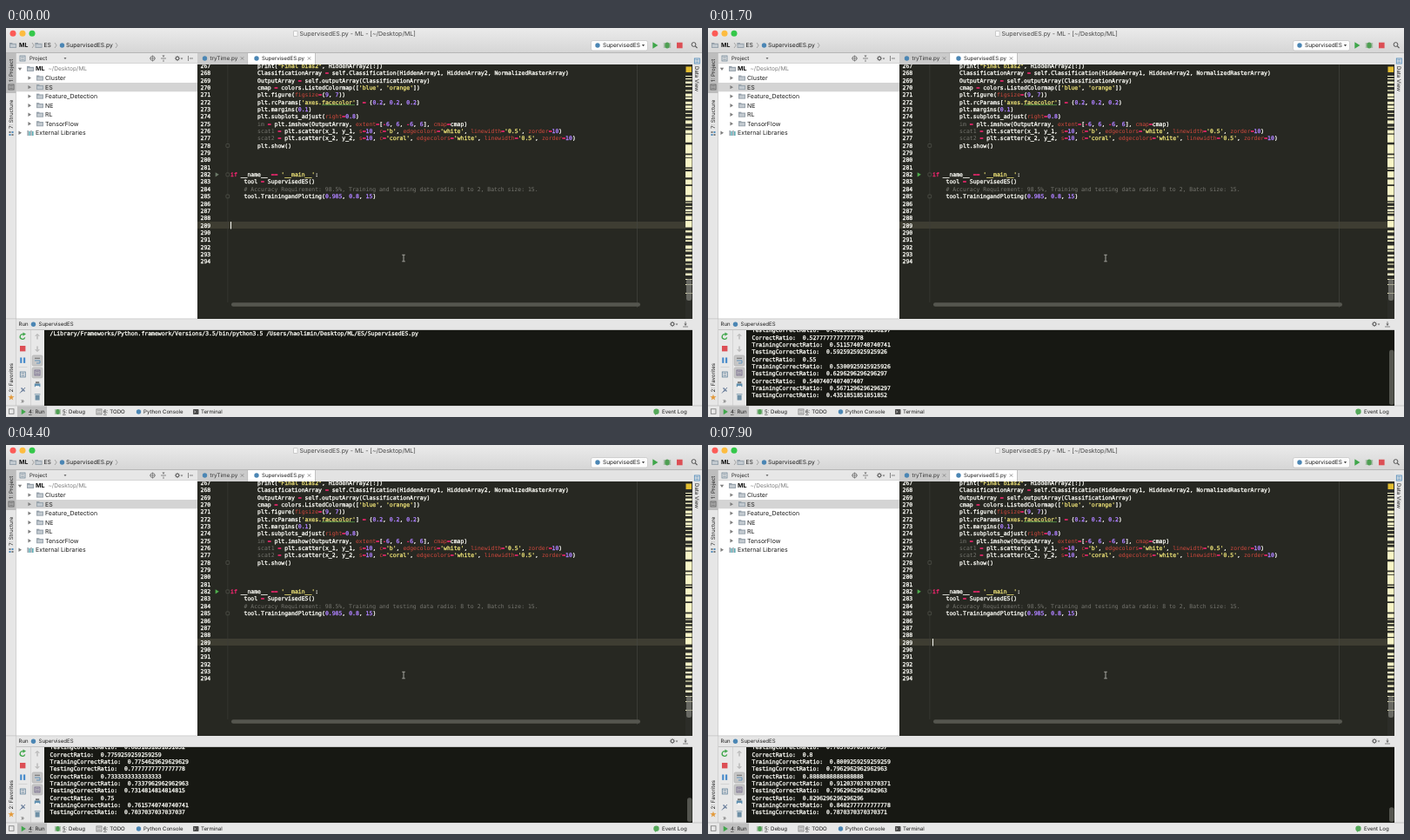
Write an HTML page with a canvas that moves like this. It is 800 px wide and 448 px high and loops after 8000 ms.

```html
<!DOCTYPE html>
<html lang="en">
<head>
<meta charset="utf-8">
<title>SupervisedES.py</title>
<style>
html, body { margin: 0; width: 100%; height: 100%; overflow: hidden; background: #e6e6e6; }
canvas { display: block; width: 800px; height: 448px; }
</style>
</head>
<body>
<canvas id="stage" width="800" height="448"></canvas>
<script>
const W = 800, H = 448, LOOP = 8000;
const UI = 'Inter, Roboto, sans-serif';
const MONO = '6.46px "DejaVu Sans Mono", "Liberation Mono", monospace';
const CHAR = 3.89, LINE = 8.346;
const DARK = '#272822', BLACK = '#171813', WHITE = '#f8f8f2', DIM = '#75756f', KWARG = '#d0483c';
const PY = '#4b86b4', GREEN = '#3fa64a', RED = '#dc4f55', GREY = '#6e6e6e';

const stage = document.getElementById('stage').getContext('2d');
const base = document.createElement('canvas');
base.width = W;
base.height = H;
let g = base.getContext('2d');
g.textRendering = stage.textRendering = 'geometricPrecision';

// ---- drawing helpers ----
function box(x, y, w, h, color) {
  g.fillStyle = color;
  g.fillRect(x, y, w, h);
}
function round(x, y, w, h, r, color, edge) {
  g.beginPath();
  g.roundRect(x, y, w, h, r);
  if (color) { g.fillStyle = color; g.fill(); }
  if (edge) { g.strokeStyle = edge; g.lineWidth = 0.6; g.stroke(); }
}
function dot(x, y, r, color) {
  g.beginPath();
  g.arc(x, y, r, 0, 7);
  g.fillStyle = color;
  g.fill();
}
function ring(x, y, r, color, w = 0.8) {
  g.beginPath();
  g.arc(x, y, r, 0, 7);
  g.strokeStyle = color;
  g.lineWidth = w;
  g.stroke();
}
function poly(points, color) {
  g.beginPath();
  for (let i = 0; i < points.length; i += 2) g.lineTo(points[i], points[i + 1]);
  g.fillStyle = color;
  g.fill();
}
function line(color, w, ...p) {
  g.beginPath();
  g.moveTo(p[0], p[1]);
  for (let i = 2; i < p.length; i += 2) g.lineTo(p[i], p[i + 1]);
  g.strokeStyle = color;
  g.lineWidth = w;
  g.stroke();
}
function clipTo(x, y, w, h) {
  g.save();
  g.beginPath();
  g.rect(x, y, w, h);
  g.clip();
}
function label(s, x, y, size = 6.1, color = '#1c1c1c', weight = 400) {
  g.font = `${weight} ${size}px ${UI}`;
  g.fillStyle = color;
  g.fillText(s, x, y + size * 0.35);
}
function sideLabel(s, x, bottom, dir = -1) {
  g.save();
  g.translate(x, bottom);
  g.rotate(dir * Math.PI / 2);
  label(s, 0, 0, 6.1);
  g.restore();
}
// a thin outline gives the heavier smoothing of bright code text
function mono(s, x, y, color = WHITE) {
  g.font = MONO;
  g.fillStyle = color;
  g.fillText(s, x, y + 2.3);
  if (color === DIM || color === KWARG) return;
  g.strokeStyle = color;
  g.lineWidth = 0.32;
  g.lineJoin = 'round';
  g.strokeText(s, x, y + 2.3);
}

// ---- icons ----
const right = (x, y, r, c) => poly([x - r * 0.7, y - r, x + r * 0.9, y, x - r * 0.7, y + r], c);
const down = (x, y, r, c) => poly([x - r, y - r * 0.7, x + r, y - r * 0.7, x, y + r * 0.8], c);
const chevron = (x, y) => line('#8c8c8c', 0.7, x - 1, y - 3, x + 1.2, y, x - 1, y + 3);
const pyFile = (x, y) => dot(x, y, 2.7, PY);
function cross(x, y) {
  line('#808080', 0.8, x - 1.7, y - 1.7, x + 1.7, y + 1.7);
  line('#808080', 0.8, x + 1.7, y - 1.7, x - 1.7, y + 1.7);
}
function folder(x, y) {
  box(x - 4, y - 3, 3.4, 2, '#8f9aa3');
  box(x - 4, y - 2.2, 8, 5.2, '#9aa5ae');
  box(x - 3, y - 1, 6, 3, '#c3cad0');
}
function gear(x, y) {
  ring(x, y, 1.8, GREY, 1.3);
  for (let a = 0; a < 8; a++) {
    const c = Math.cos(a * Math.PI / 4), s = Math.sin(a * Math.PI / 4);
    line(GREY, 0.8, x + 2 * c, y + 2 * s, x + 3.1 * c, y + 3.1 * s);
  }
  down(x + 5, y + 0.5, 1.3, GREY);
}
function hide(x, y) {
  line(GREY, 0.8, x, y - 3, x, y + 1);
  down(x, y + 0.8, 1.7, GREY);
  line(GREY, 0.8, x - 3, y + 3, x + 3, y + 3);
}
function bug(x, y, r = 3) {
  for (let k = -1; k < 2; k++) line('#4d7f4d', 0.7, x - r - 0.6, y + k * 2, x + r + 0.6, y + k * 2);
  g.beginPath();
  g.ellipse(x, y, r * 0.75, r, 0, 0, 7);
  g.fillStyle = '#4f9f53';
  g.fill();
}
function arrow(x, y, dir) {
  line('#a4a4a4', 1, x, y - 3 * dir, x, y + 2 * dir);
  line('#a4a4a4', 1, x - 2.2, y + 0.7 * dir, x, y + 3 * dir, x + 2.2, y + 0.7 * dir);
}
function sheet(x, y, color) {
  g.strokeStyle = color;
  g.lineWidth = 0.8;
  g.strokeRect(x - 3, y - 3, 6, 6);
  for (let k = -1; k < 2; k++) line(color, 0.6, x - 1.8, y + k * 1.6, x + 1.8, y + k * 1.6);
}

// ---- window parts ----
function titleAndToolbar() {
  const fade = g.createLinearGradient(0, 0, 0, 28);
  fade.addColorStop(0, '#ebebeb');
  fade.addColorStop(1, '#d6d6d6');
  box(0, 0, W, 28, fade);
  ['#fc5b57', '#fdbc40', '#34c84a'].forEach((c, i) => dot(8 + i * 11, 6.3, 3.5, c));
  round(330.5, 3.5, 4.6, 6, 0.4, '#fafafa', '#b0b0b0');
  label('SupervisedES.py - ML - [~/Desktop/ML]', 337.5, 6.5, 7, '#464646');

  folder(8, 20);
  label('ML', 15, 20, 6.9, '#111', 700);
  chevron(31, 20);
  folder(37.5, 20);
  label('ES', 43.5, 20, 6.8);
  chevron(57, 20);
  pyFile(64.5, 20);
  label('SupervisedES.py', 69, 20, 6.7);
  chevron(127, 20);

  round(672.5, 14.5, 65, 11.5, 2, '#fcfcfc', '#bcbcbc');
  pyFile(680, 20);
  label('SupervisedES', 686, 20, 6.5);
  down(732.5, 20, 1.6, '#444');
  right(746, 20, 3.8, GREEN);
  bug(760, 20, 3.6);
  box(771, 16.7, 6.6, 6.6, RED);
  ring(790.5, 19, 2.4, '#555', 1);
  line('#555', 1.1, 792.3, 20.8, 794.5, 23);
  box(0, 28, W, 1, '#b6b6b6');
}

function sideStrips() {
  box(0, 29, 12, H, '#e6e6e6');
  box(0, 29, 11.5, 46, '#bdbdbd');
  sideLabel('1: Project', 6, 62);
  sheet(6, 68, '#555');
  sideLabel('7: Structure', 6, 116);
  for (let k = 0; k < 4; k++) box(3.5 + k % 2 * 3, 119 + (k >> 1) * 3, 2, 2, k % 3 ? '#4a87b8' : '#777');
  sideLabel('2: Favorites', 6, 419.5);
  const star = [];
  for (let i = 0; i < 10; i++) {
    const r = i % 2 ? 1.5 : 3.8, a = i * Math.PI / 5 - Math.PI / 2;
    star.push(6 + r * Math.cos(a), 425.5 + r * Math.sin(a));
  }
  poly(star, '#e39a3b');
  box(11.5, 29, 0.7, 406, '#bdbdbd');

  box(789, 29, 11, 406, '#e6e6e6');
  sheet(794.3, 38, '#4a87b8');
  sideLabel('Data View', 794, 44, 1);
}

function projectPanel() {
  box(12, 29, 208, 11, '#e7e7e7');
  box(12, 40, 208, 295, '#fff');
  box(12, 40, 208, 0.7, '#c4c4c4');
  sheet(19, 35, '#6f8596');
  label('Project', 27, 35);
  down(68, 35, 1.5, GREY);
  ring(168.5, 35, 2.6, GREY);
  line(GREY, 0.7, 165, 35, 172, 35);
  line(GREY, 0.7, 168.5, 31.5, 168.5, 38.5);
  line(GREY, 0.8, 178, 35, 184, 35);
  down(181, 32.6, 1.5, GREY);
  line(GREY, 0.8, 181, 36.5, 181, 39);
  gear(197, 35);
  line(GREY, 0.8, 209.5, 32, 209.5, 38);
  line(GREY, 0.8, 215, 35, 211, 35);

  box(12, 63, 208, 10.3, '#d4d4d4');
  down(16, 47.2, 2.2, '#7d7d7d');
  folder(28, 47);
  label('ML', 34, 47, 7, '#111', 700);
  label('~/Desktop/ML', 48.5, 47, 6.6, '#7d7d7d');
  ['Cluster', 'ES', 'Feature_Detection', 'NE', 'RL', 'TensorFlow'].forEach((name, i) => {
    const y = 57.6 + i * 10.53;
    right(27, y, 2.2, '#7d7d7d');
    folder(39, y);
    label(name, 45, y, 7);
  });
  right(16, 120.8, 2.2, '#7d7d7d');
  for (let k = 0; k < 4; k++) box(24.5 + k * 1.9, 118 + k % 2, 1.3, 6 - k % 2, k % 2 ? '#3f9fa8' : '#8a969f');
  label('External Libraries', 34, 120.8, 7);
}

function tabs() {
  box(220, 29, 569, 13, '#e3e3e3');
  box(220, 29, 57.5, 13, '#cbcbcb');
  pyFile(228.5, 35);
  label('tryTime.py', 234.5, 35, 6.3, '#333');
  cross(271.5, 35);
  box(278, 29, 77, 13, '#fff');
  pyFile(288, 35);
  label('SupervisedES.py', 294, 35, 6.1);
  cross(348.5, 35);
  box(277.5, 29, 0.6, 13, '#aaa');
  box(355, 29, 0.6, 13, '#aaa');
}

// ---- code ----
const body = [
  'print("Final bias2", HiddenArray2[:])',
  'ClassificationArray = self.Classification(HiddenArray1, HiddenArray2, NormalizedRasterArray)',
  'OutputArray = self.outputArray(ClassificationArray)',
  "cmap = colors.ListedColormap(['blue', 'orange'])",
  'plt.figure(figsize=(9, 7))',
  "plt.rcParams['axes.facecolor'] = (0.2, 0.2, 0.2)",
  'plt.margins(0.1)',
  'plt.subplots_adjust(right=0.8)',
  'im = plt.imshow(OutputArray, extent=[-6, 6, -6, 6], cmap=cmap)',
  "scat1 = plt.scatter(x_1, y_1, s=10, c='b', edgecolors='white', linewidth='0.5', zorder=10)",
  "scat2 = plt.scatter(x_2, y_2, s=10, c='coral', edgecolors='white', linewidth='0.5', zorder=10)",
  'plt.show()'
].map(s => ' '.repeat(8) + s);
const code = body.concat('', '', '',
  "if __name__ == '__main__':",
  '    tool = SupervisedES()',
  '    # Accuracy Requirement: 98.5%, Training and testing data radio: 8 to 2, Batch size: 15.',
  '    tool.TrainingandPloting(0.985, 0.8, 15)');

const rules = [
  [/^#.*/, DIM],
  [/^(['"]).*?\1/, '#e6db74'],
  [/^(if\b|==?|-)/, '#f92672'],
  [/^(im|scat\d)\b/, DIM],
  [/^[a-z]+(?==[^= ])/, KWARG],
  [/^\d[\d.]*/, '#ae81ff'],
  [/^\w+|^\s+|^./, WHITE]
];
const lineY = n => 52 + (n - 268) * LINE;

function codeLine(text, y) {
  let col = 0;
  while (col < text.length) {
    const rest = text.slice(col);
    const [re, color] = rules.find(r => r[0].test(rest));
    const token = rest.match(re)[0];
    mono(token, 258 + col * CHAR, y, color);
    col += token.length;
  }
}

function errorStripe() {
  let seed = 11;
  const rand = () => (seed = seed * 16807 % 2147483647) / 2147483647;
  box(781, 42, 8, 293, '#2c2d28');
  box(781.5, 44.5, 6.5, 6.5, '#e3bd2f');
  for (let y = 55; y < 284;) {
    const dense = Math.exp(-(((y - 150) / 60) ** 2));
    const h = 1 + rand() * rand() * (5 + 7 * dense);
    box(781, y, 7.5, h, '#f8f5c6');
    y += h + 0.8 + rand() * (4 - 2 * dense);
  }
  [289, 295, 305].forEach(y => box(781, y, 7.5, 1, '#f8f5c6'));
  round(782, 289, 6, 25, 2.5, 'rgba(130,131,124,.7)');
}

function editor() {
  clipTo(220, 42, 569, 293);
  box(220, 42, 569, 293, DARK);
  box(220, 223, 561, 8, '#3e3d32');
  box(254.6, 42, 0.6, 274, '#3c3d37');
  box(725, 42, 0.7, 280, '#45463f');
  for (let n = 267; n < 295; n++) mono(String(n), 223.5, lineY(n));
  for (const n of [278, 282, 285]) round(252.9, lineY(n) - 1.9, 3.8, 3.8, 0.6, DARK, '#5f6058');
  code.forEach((s, i) => codeLine(s, lineY(267 + i)));
  for (let x = 363; x < 401; x += 2) line('#5fae4e', 0.7, x, 89, x + 1, 88.2, x + 2, 89);
  round(259, 316.3, 470, 4.4, 2.2, '#55564f');
  errorStripe();
  g.restore();
  // mouse pointer
  line('#c9c9c4', 0.8, 457, 261.8, 457, 268.4);
  line('#c9c9c4', 0.8, 455.3, 261.3, 458.7, 261.3);
  line('#c9c9c4', 0.8, 455.3, 268.8, 458.7, 268.8);
}

function runPanel() {
  box(12, 335, 777, 13, '#e6e6e6');
  box(0, 334.6, 220, 0.6, '#b8b8b8');
  label('Run', 14.5, 341.3);
  pyFile(31.5, 341.3);
  label('SupervisedES', 37.5, 341.3);
  gear(766, 341);
  hide(781, 341);
  box(12, 347.2, 777, 0.8, '#bcbcbc');
  box(12, 348, 32, 87, '#e8e8e8');
  box(28, 348, 0.6, 87, '#c6c6c6');

  g.beginPath();
  g.arc(19, 355.5, 2.8, 0.3, 5);
  g.strokeStyle = GREEN;
  g.lineWidth = 1.3;
  g.stroke();
  right(21, 352.6, 2.2, GREEN);
  box(16, 366, 6.4, 6.4, RED);
  box(16.2, 379.5, 2.2, 6.4, '#4a8ccb');
  box(20, 379.5, 2.2, 6.4, '#4a8ccb');
  box(14.5, 390, 10, 0.6, '#c6c6c6');
  sheet(19.3, 399, '#5f7f98');
  line('#6b7f9c', 1.4, 17.5, 414.5, 21.5, 418.5);
  line('#6b7f9c', 1, 19, 417, 16, 420.5);
  line('#6b7f9c', 1, 18, 419, 22, 414);
  label('»', 17, 429.5, 7, '#555');

  arrow(36, 355.5, -1);
  arrow(36, 369.5, 1);
  round(30.2, 377, 11.6, 12, 1.5, '#c6c6c6', '#aaa');
  line('#555', 0.8, 33, 380.3, 39, 380.3);
  line('#4a87b8', 0.8, 33, 383, 39, 383, 39, 386, 35, 386);
  round(30.2, 391, 11.6, 12, 1.5, '#c6c6c6', '#aaa');
  sheet(36, 397, '#6b5f86');
  box(32.8, 409.5, 6.6, 3.6, '#5f8fb0');
  box(34, 407.3, 4.2, 2, '#777');
  box(34, 412.2, 4.2, 2.6, '#f4f4f4');
  box(33.6, 423, 5, 5.6, '#6d8fa5');
  box(32.8, 421.4, 6.6, 1, '#6d8fa5');
}

function statusBar() {
  box(0, 435, W, 13, '#e8e8e8');
  box(0, 434.6, W, 0.8, '#bcbcbc');
  g.strokeStyle = '#777';
  g.lineWidth = 0.8;
  g.strokeRect(3.5, 438.8, 5.5, 5.5);
  box(13, 435.4, 34, 12.6, '#bebebe');
  right(20, 442, 3.2, GREEN);
  bug(59.5, 442);
  sheet(107, 442, '#777');
  pyFile(152.5, 442);
  round(215, 439, 6.5, 6, 0.8, '#4a4a4a');
  line('#fff', 0.7, 216.3, 440.6, 217.7, 442, 216.3, 443.4);
  const items = [[26, '4: Run'], [65, '5: Debug'], [112, '6: TODO'], [158, 'Python Console'], [224, 'Terminal'], [754, 'Event Log']];
  for (const [x, s] of items) {
    label(s, x, 442);
    if (s[1] === ':') box(x, 445.2, 3.6, 0.6, '#333');
  }
  dot(747.5, 441.8, 3.2, '#55a85a');
  poly([745, 443, 746.5, 446, 748, 444], '#55a85a');
}

// ---- console output: correct answers in the training and testing sets ----
const scores = [
  [220, 50], [221, 64], [229, 68], [245, 47], [284, 55], [272, 69], [293, 74], [335, 84], [317, 79],
  [329, 76], [336, 84], [361, 77], [369, 87], [357, 76], [346, 86], [394, 86], [363, 85]
];
const log = ['/Library/Frameworks/Python.framework/Versions/3.5/bin/python3.5 /Users/haolimin/Desktop/ML/ES/SupervisedES.py'];
for (const [a, b] of scores) {
  log.push('CorrectRatio:  ' + (a + b) / 540,
    'TrainingCorrectRatio:  ' + a / 432,
    'TestingCorrectRatio:  ' + b / 108);
}

function consoleView(t) {
  const top = 348, height = 87;
  const count = 1 + 3 * Math.min(scores.length, Math.floor((t + 190) / 455));
  const total = (count + 1) * LINE;
  const shift = Math.max(0, total - 87.8);
  clipTo(44, top, 745, height);
  box(44, top, 745, height, BLACK);
  for (let i = 0; i < count; i++) {
    const y = 352 + i * LINE - shift;
    if (y > top - 6) mono(log[i], 50.5, y);
  }
  if (shift) {
    const h = 86 * 86 / total;
    round(783, 434 - h, 5.5, h, 2.5, '#54554f');
  }
  g.restore();
}

function draw(t) {
  g = stage;
  g.drawImage(base, 0, 0);
  right(242.5, lineY(282), 2.6, t < 265 ? '#6c7a69' : '#4fae4d');
  if ((t + 185) % 660 < 330) box(258, lineY(289) - 4.2, 1, 8.4, WHITE);
  consoleView(t);
}

box(0, 0, W, H, '#e6e6e6');
titleAndToolbar();
sideStrips();
projectPanel();
tabs();
editor();
runPanel();
statusBar();

const start = performance.now();
function tick() {
  draw((performance.now() - start) % LOOP);
  requestAnimationFrame(tick);
}
tick();
</script>
</body>
</html>
```
